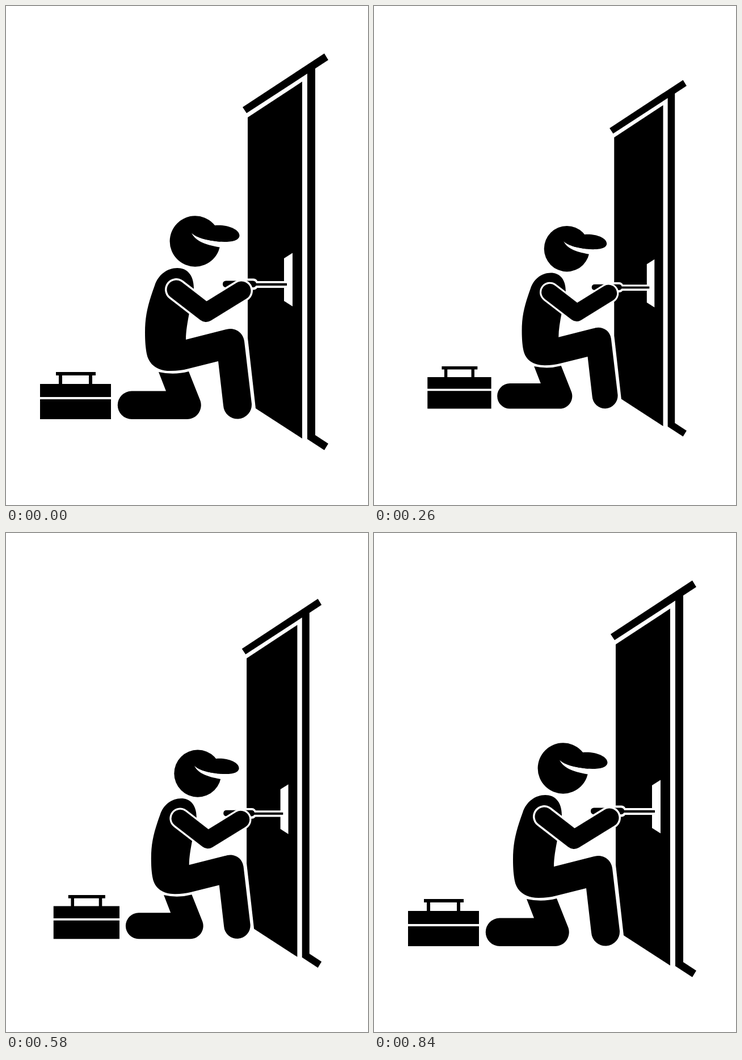
An HTML page that plays this animation: 638 by 878 pixels, repeating every 2980 ms.

```html
<!DOCTYPE html>
<html lang="en">
<head>
<meta charset="utf-8">
<title>Door repair</title>
<style>
  html, body { margin: 0; width: 100%; height: 100%; overflow: hidden; background: #fff; }
  svg { display: block; width: 100%; height: 100%; }
  .white { fill: #fff; }
  .line { fill: none; stroke: #000; stroke-linecap: round; stroke-linejoin: round; }
  .halo { stroke: #fff; }
</style>
</head>
<body>
<svg viewBox="0 0 638 878">
  <defs>
    <path id="arm" d="M300 499 L352.5 539.5 L415 501"/>
  </defs>
  <g id="scene">
    <!-- door and frame -->
    <path d="M417 178 L561 83.5 L568 95 L545 110 V755 L568 770 L561 781.5 L531 762 V119 L424 188.5Z"/>
    <path d="M426 196 L522 133 V761 L440 708 L426 584Z"/>
    <path class="white" d="M490 444 L505 434.5 V528.5 L490 519Z"/>

    <!-- screwdriver -->
    <path class="white" d="M440 484 H491 V496 H440Z"/>
    <rect class="white" x="378" y="479.5" width="66" height="20" rx="8"/>
    <rect x="382" y="483.5" width="59" height="11.5" rx="5.5"/>
    <path d="M438 487.8 H495 V492 H438Z"/>

    <!-- worker -->
    <path d="M269 644 Q296 650 322 643 L341.5 692 A24.7 24.7 0 0 1 319 727 H221.5 A24.7 24.7 0 0 1 221.5 677.5 H282Z"/>
    <path d="M331 497 C331 472 318 461 302 461 C284 461 268 473 262 492 C250 525 245 545 245 575 C245 590 246 602 248 612
      C252 632 268 642 290 642 C302 642 312 640.5 320 638.5 L374 625 L383 703 A25 25 0 0 0 433 700
      L420 590 C418 575 406 568 395 568 C391 568 388 569 384 570 L317 587 C317 572 320 556 323 540Z"/>
    <use href="#arm" class="line halo" stroke-width="40"/>
    <use href="#arm" class="line" stroke-width="33"/>
    <circle cx="333.3" cy="414" r="44.7"/>
    <path class="white" d="M327 399 C335 408 358 414 385 415 L380 425 C355 421 334 415 327 399Z"/>
    <path d="M360 390 L368 386 C388 384 411.5 392 411.5 404 C411 413 397 415 385 415 C358 414 335 408 327 399Z"/>

    <!-- toolbox -->
    <path d="M60 665 H93 V650 H88 V644 H158 V650 H152 V665 H185 V688 H60Z M99 650 V665 H146 V650Z M60 692 H185 V727 H60Z" fill-rule="evenodd"/>
  </g>
</svg>
<script>
  const LOOP = 2980, STEP = 20;
  const SHRINK_END = 360, GROW_END = 843, DEPTH = 0.123;
  const PIVOT = { x: 399, y: 545 };
  const scene = document.getElementById('scene');

  const ease = p => (1 - Math.cos(Math.PI * Math.min(1, p))) / 2;

  function scaleAt(t) {
    const amount = t < SHRINK_END
      ? ease(t / SHRINK_END)
      : 1 - ease((t - SHRINK_END) / (GROW_END - SHRINK_END));
    return 1 - DEPTH * amount;
  }

  function render(time) {
    const t = Math.floor((time % LOOP) / STEP) * STEP;
    const s = scaleAt(t);
    scene.setAttribute('transform',
      `translate(${PIVOT.x * (1 - s)} ${PIVOT.y * (1 - s)}) scale(${s})`);
  }

  const start = performance.now();
  function tick() {
    render(performance.now() - start);
    requestAnimationFrame(tick);
  }
  tick();
</script>
</body>
</html>
```
